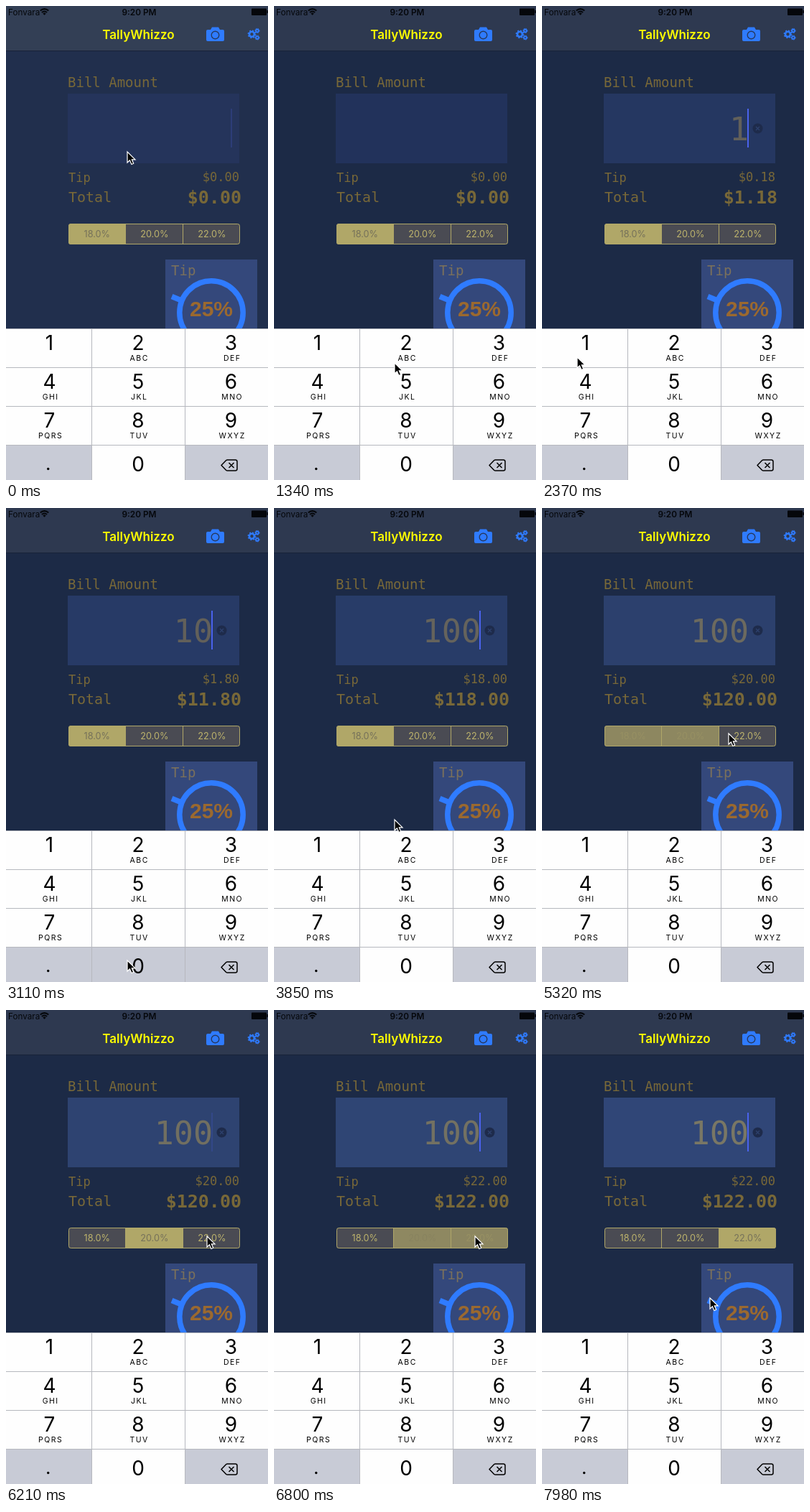
Write an HTML page that moves like this. It is 365 by 660 pixels and loops after 8000 ms.

```html
<!DOCTYPE html>
<html lang="en">
<head>
<meta charset="utf-8">
<title>Tip calculator</title>
<style>
html, body { margin: 0; width: 100%; height: 100%; overflow: hidden; background: #1c2a46; }
svg { display: block; width: 365px; height: 660px; font-family: Inter, Roboto, sans-serif; }
.mid { text-anchor: middle; }
.end { text-anchor: end; }
.mono { font-family: "DejaVu Sans Mono", "Noto Sans Mono", monospace; fill: #786838; }
.blue { fill: #2f7bff; }
.ring { fill: none; stroke: #2f7bff; stroke-width: 7.5; }
.line { stroke: #b6b8be; stroke-width: 1; }
.digit { font-size: 28px; }
.letters { font-size: 10.5px; letter-spacing: 1.5px; }

#page, #nav, #field, #bill, #caret { animation: 8s linear infinite; }
#page { animation-name: page; }
#nav { animation-name: nav; }
#field { animation-name: field; }
#bill { animation-name: bill; }
#caret { animation-name: blink; fill: #4a62ec; }
@keyframes page { 0%, 1.8% { fill: #212f4d; } 11%, 100% { fill: #1c2a46; } }
@keyframes nav { 0%, 1.8% { fill: #333f55; } 11%, 100% { fill: #2e3950; } }
@keyframes field {
  0% { fill: #25345b; } 17% { fill: #22325b; } 39% { fill: #273a66; }
  57% { fill: #293d6a; } 66% { fill: #2c406d; } 85% { fill: #2f4574; } 100% { fill: #304677; }
}
@keyframes bill { 0%, 39% { fill: #62605a; } 100% { fill: #797765; } }
@keyframes blink {
  0%, 1.8%, { opacity: .2; }
  0%, 1.8% { opacity: .2; }
  5%, 11% { opacity: 1; }
  14.5%, 20% { opacity: 0; }
  22%, 53% { opacity: 1; }
  56.5%, 59.5% { opacity: 0; }
  61%, 63.5% { opacity: 1; }
  65.5%, 70% { opacity: 0; }
  72%, 76% { opacity: 1; }
  78%, 81.5% { opacity: 0; }
  83.5%, 88% { opacity: 1; }
  90%, 93.5% { opacity: 0; }
  96%, 100% { opacity: 1; }
}
</style>
</head>
<body>
<svg viewBox="0 0 365 660">
  <rect id="page" width="365" height="660" fill="#1c2a46"/>
  <rect id="nav" width="365" height="62" fill="#2e3950"/>
  <path d="M0 62.5H365" stroke="#182238"/>

  <!-- Status bar -->
  <g fill="#05070b">
    <text x="3" y="12.5" font-size="11.7">Fonvara</text>
    <g fill="none" stroke="#05070b" stroke-width="2">
      <path d="M47.7 6.6Q53.5 1.6 59.3 6.6M49.9 9Q53.5 6 57.1 9"/>
    </g>
    <path d="M51.3 10.4Q53.5 8.8 55.7 10.4L53.5 12.8Z"/>
    <text class="mid" x="185.5" y="12.5" font-size="11.8" font-weight="600">9:20 PM</text>
    <rect x="342" y="3.5" width="21" height="9.5" rx="1"/>
    <rect x="363.5" y="6" width="1.5" height="4"/>
  </g>

  <!-- Navigation bar -->
  <text class="mid" x="184.5" y="46" font-size="17" font-weight="600" fill="#ff0">TallyWhizzo</text>
  <path class="blue" d="M281 33H285L287 29.5H296L298 33H302Q304 33 304 35V47Q304 49 302 49H281Q279 49 279 47V35Q279 33 281 33Z"/>
  <circle cx="291.5" cy="40.5" r="5.3" fill="none" stroke="#26395f" stroke-width="1.4"/>
  <g fill="none" stroke="#2f7bff">
    <circle cx="342.5" cy="39.3" r="3.5" stroke-width="2.6"/>
    <circle cx="342.5" cy="39.3" r="5.1" stroke-width="1.6" stroke-dasharray="2 2"/>
    <g stroke-width="1.9">
      <circle cx="350" cy="34.4" r="1.9"/>
      <circle cx="350" cy="44" r="1.9"/>
    </g>
    <g stroke-width="1" stroke-dasharray="1.5 1.5">
      <circle cx="350" cy="34.4" r="3.1"/>
      <circle cx="350" cy="44" r="3.1"/>
    </g>
  </g>

  <!-- Bill -->
  <text class="mono" x="86" y="113" font-size="19">Bill Amount</text>
  <rect id="field" x="86" y="122" width="239" height="97" fill="#273a66"/>
  <text id="bill" class="mono end" x="288" y="187" font-size="45"></text>
  <g id="clear">
    <circle cx="300.5" cy="170.5" r="7" fill="#1e2b4b"/>
    <path d="M298 168l5 5m0-5l-5 5" stroke="#2d416d" stroke-width="1.3"/>
  </g>
  <rect id="caret" y="143" width="2" height="54"/>
  <text class="mono" x="87" y="245" font-size="17">Tip</text>
  <text id="tip" class="mono end" x="325" y="244" font-size="17"></text>
  <text class="mono" x="87" y="273" font-size="20">Total</text>
  <text id="total" class="mono end" x="328" y="275" font-size="25" font-weight="700"></text>

  <!-- Rate picker -->
  <clipPath id="round"><rect x="87" y="303" width="239" height="29" rx="3.5"/></clipPath>
  <g id="rates" clip-path="url(#round)"></g>
  <path d="M166.5 303V332M246.5 303V332" stroke="#b0a768"/>
  <rect x="87.5" y="303.5" width="238" height="28" rx="3" fill="none" stroke="#b0a768"/>

  <!-- Tip dial -->
  <rect x="222" y="353" width="128" height="107" fill="#34487b"/>
  <text class="mono" x="230" y="375" font-size="19" style="fill:#7a705c">Tip</text>
  <circle class="ring" cx="286" cy="427" r="44.2"/>
  <path class="ring" d="M231 404.5L245 410.3"/>
  <text class="mid" x="286" y="431.5" font-size="30" font-weight="700" fill="#9b692f"
    font-family="Liberation Sans, Arial, sans-serif">25%</text>

  <!-- Keypad -->
  <rect y="449" width="365" height="211" fill="#fefefe"/>
  <path d="M0 611H119V660H0ZM250 611H365V660H250Z" fill="#c8cbd6"/>
  <rect id="zero" x="120" y="611" width="129" height="49" fill="#c8cbd6"/>
  <path class="line" d="M0 449.5H365M0 503.5H365M0 557.5H365M0 611.5H365M119.5 449V660M249.5 449V660"/>
  <g id="keys"></g>
  <circle cx="58.7" cy="644.5" r="1.7"/>
  <g fill="none" stroke="#000" stroke-width="1.5" stroke-linejoin="round">
    <path d="M300 639.5L306.5 632.8Q307.3 632 308.5 632H319.5Q322 632 322 634.5V644.5Q322 647 319.5 647H308.5Q307.3 647 306.5 646.2Z"/>
    <path d="M310.5 636l7 7m0-7l-7 7"/>
  </g>

  <path id="pointer" d="M0 0V15L3.4 11.8L5.9 17.5L8.7 16.3L6.3 10.8H11Z" stroke="#fff" stroke-width="1.2"/>
</svg>
<script>
const LOOP = 8000, STEP = 147.7;
const $ = id => document.getElementById(id);

function add(parent, tag, attrs, text = '') {
  const el = document.createElementNS('http://www.w3.org/2000/svg', tag);
  for (const name in attrs) el.setAttribute(name, attrs[name]);
  el.textContent = text;
  return parent.appendChild(el);
}

const letters = ['', 'ABC', 'DEF', 'GHI', 'JKL', 'MNO', 'PQRS', 'TUV', 'WXYZ'];
letters.forEach((word, i) => {
  const x = [60.5, 184, 313.5][i % 3], y = 479 + 54 * Math.floor(i / 3);
  add($('keys'), 'text', { class: 'mid digit', x, y }, i + 1);
  add($('keys'), 'text', { class: 'mid letters', x: x + 1.7, y: y + 15 }, word);
});
add($('keys'), 'text', { class: 'mid digit', x: 184, y: 648 }, 0);

const rates = [18, 20, 22];
const segments = rates.map((rate, i) => {
  const x = 87 + 80 * i, box = { x, y: 303, width: 80, height: 29 };
  add($('rates'), 'rect', { ...box, fill: '#4a4b53' });
  return {
    fill: add($('rates'), 'rect', { ...box, fill: '#b0a768' }),
    label: add($('rates'), 'text', { class: 'mid', x: x + 39.8, y: 322, 'font-size': 12.7 }, rate.toFixed(1) + '%')
  };
});

// Pointer path: time, x, y
const path = [
  [0, 169, 203], [150, 169, 300], [300, 170, 480], [590, 170, 631], [890, 168, 506],
  [1190, 168, 504], [1340, 168, 497], [1480, 110, 485], [1630, 28, 478], [1780, 41, 475],
  [2220, 41, 475], [2370, 50, 490], [2670, 140, 615], [2820, 168, 634], [2960, 169, 630],
  [3700, 169, 630], [3850, 168, 420], [4000, 178, 310], [4150, 178, 310], [4290, 179, 314],
  [4440, 184, 321], [4590, 189, 318], [5030, 190, 317], [5170, 215, 315], [5320, 260, 314],
  [5470, 275, 316], [5610, 280, 317], [5760, 280, 315], [6950, 280, 315], [7100, 280, 318],
  [7250, 275, 336], [7400, 261, 370], [7550, 247, 396], [7690, 240, 402], [7980, 234, 401], [8000, 234, 401]
];
const clamp = v => Math.max(0, Math.min(1, v));
const money = v => '$' + v.toFixed(2);

function pointerAt(t) {
  const i = path.findIndex(p => p[0] > t);
  const [t0, x0, y0] = path[i - 1], [t1, x1, y1] = path[i];
  const p = (t - t0) / (t1 - t0);
  return [x0 + (x1 - x0) * p, y0 + (y1 - y0) * p].map(Math.round);
}

function draw(time) {
  // The screen refreshes in even steps, rounded to 10 ms
  const t = Math.round(Math.floor((time + 1) / STEP) * STEP / 10) * 10;

  const bill = t < 2060 ? 0 : t < 2950 ? 1 : t < 3390 ? 10 : 100;
  const rate = t < 5160 ? 18 : t < 6350 ? 20 : 22;
  const tip = bill * rate / 100;
  $('bill').textContent = bill || '';
  $('tip').textContent = money(tip);
  $('total').textContent = money(bill + tip);
  $('clear').style.visibility = bill ? 'visible' : 'hidden';
  $('caret').setAttribute('x', bill ? 286 : 313);
  $('zero').style.visibility = t >= 2810 && t < 3390 ? 'visible' : 'hidden';

  const first = clamp((t - 5030) / 580), second = clamp((t - 6510) / 580);
  [1 - first, first - second, second].forEach((on, i) => {
    const { fill, label } = segments[i];
    fill.setAttribute('opacity', on ** .6);
    label.setAttribute('fill', on > .5 ? '#75715a' : '#bdb36c');
    label.setAttribute('opacity', clamp(Math.abs(2 * on - 1) + .2));
  });

  $('pointer').setAttribute('transform', `translate(${pointerAt(t)})`);
}

let start;
function tick(now) {
  start ??= now;
  draw((now - start) % LOOP);
  requestAnimationFrame(tick);
}
draw(0);
requestAnimationFrame(tick);
</script>
</body>
</html>
```
